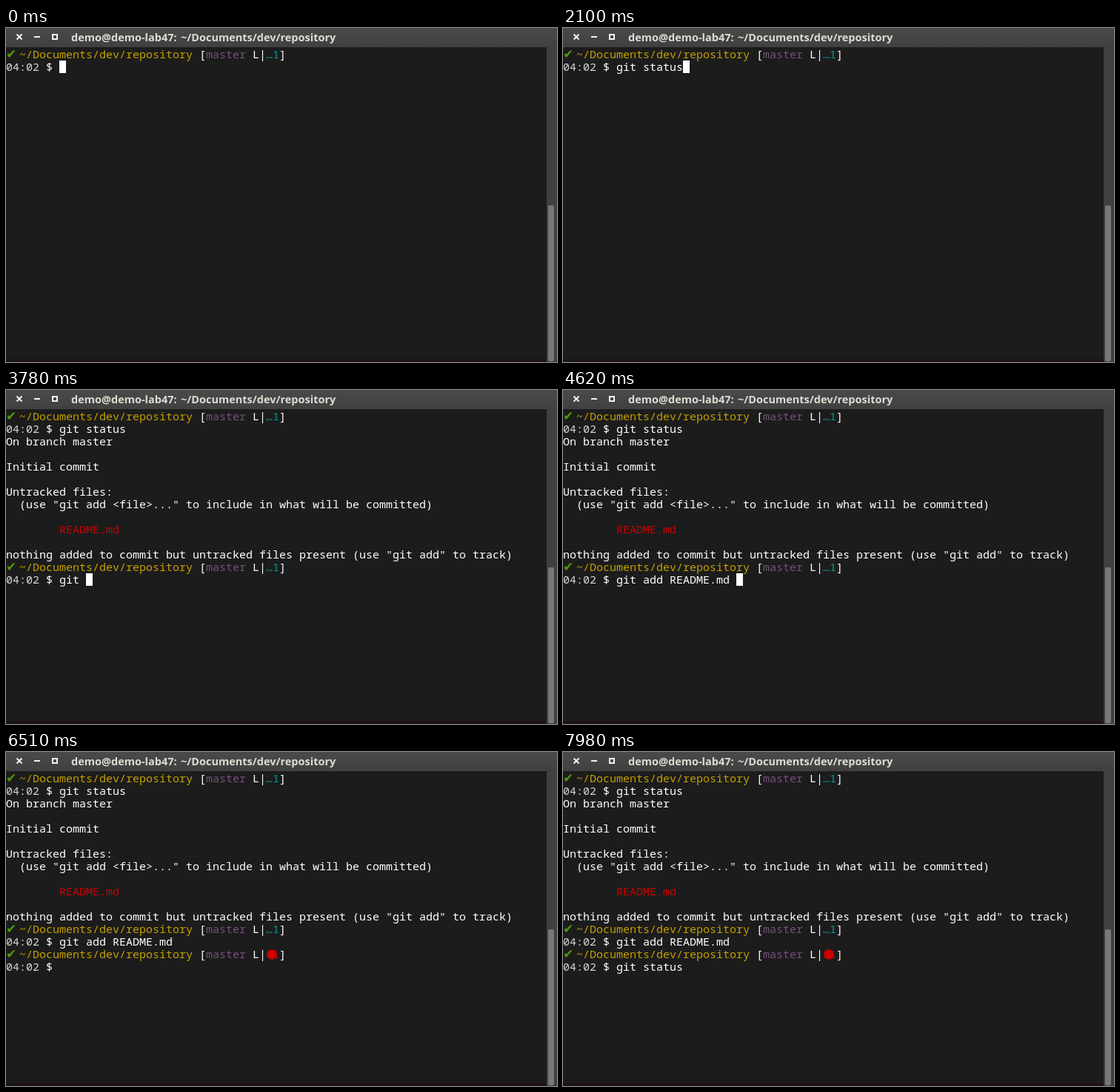
These frames come from a looping animation (744 by 452 pixels, 8 s). An HTML page:

```html
<!DOCTYPE html>
<html lang="en">
<head>
<meta charset="utf-8">
<title>Terminal</title>
<style>
  html, body { margin: 0; width: 100%; height: 100%; overflow: hidden; background: #1c1c1c; }
  svg { display: block; width: 744px; height: 452px; }
  text { white-space: pre; }
  #screen text { font: 15px "Noto Sans Mono", "Liberation Mono", monospace; }
  #screen .mark { font: 17px "DejaVu Sans", sans-serif; }
  .title { font: bold 14.5px "Open Sans", "Noto Sans", sans-serif; fill: #dfdbd2; }
</style>
</head>
<body>
<svg viewBox="0 0 744 452">
  <defs>
    <linearGradient id="bar" x2="0" y2="1">
      <stop offset="0" stop-color="#4a4a4a"/>
      <stop offset="1" stop-color="#404040"/>
    </linearGradient>
  </defs>
  <rect width="744" height="452" fill="#1c1c1c"/>
  <rect y="448" width="744" height="4" fill="#1d1217"/>
  <rect x="730" y="26" width="14" height="426" fill="#404040"/>
  <rect x="732" y="240" width="8" height="211" rx="2" fill="#787878"/>
  <rect width="744" height="26" fill="url(#bar)"/>
  <g fill="none" stroke="#f4f2ee" stroke-width="2">
    <path d="M14.5 8.5l7 7m0-7l-7 7M38 12h8"/>
    <rect x="63" y="9" width="6" height="6"/>
  </g>
  <text class="title" x="88" y="18">demo@demo-lab47:</text>
  <text class="title" x="236" y="18">~/Documents/dev/repository</text>
  <g id="screen"></g>
</svg>
<script>
const NS = 'http://www.w3.org/2000/svg';
const CELL = 9, LINE = 17, TOP = 27, LOOP = 8000;
const WHITE = '#ffffff', GREY = '#d3d7cf', YELLOW = '#c4a000', PURPLE = '#75507b',
      TEAL = '#06989a', GREEN = '#4e9a06', RED = '#cc0000';
const screen = document.getElementById('screen');

function add(parent, tag, attrs = {}) {
  const el = document.createElementNS(NS, tag);
  for (const k in attrs) el.setAttribute(k, attrs[k]);
  return parent.appendChild(el);
}

function put(parent, row, col, str, fill = WHITE) {
  const el = add(parent, 'text', { x: col * CELL, y: TOP + row * LINE + 14, fill });
  el.textContent = str;
  return el;
}

// Two-line prompt; returns the text element for the typed command.
function prompt(parent, row, staged) {
  put(parent, row, 0, '✔', GREEN).setAttribute('class', 'mark');
  put(parent, row, 2, '~/Documents/dev/repository', YELLOW);
  put(parent, row, 29, '[');
  put(parent, row, 30, 'master', PURPLE);
  put(parent, row, 37, 'L|');
  if (staged) {
    add(parent, 'circle', { cx: 359, cy: TOP + row * LINE + 9, r: 6.8, fill: RED });
  } else {
    put(parent, row, 39, '…', TEAL);
  }
  put(parent, row, 40, '1', staged ? RED : TEAL);
  put(parent, row, 41, ']');
  put(parent, row + 1, 0, '04:02', GREY);
  put(parent, row + 1, 6, '$');
  return put(parent, row + 1, 8, '');
}

const output = add(screen, 'g');
[
  [2, 0, 'On branch master'],
  [4, 0, 'Initial commit'],
  [6, 0, 'Untracked files:'],
  [7, 2, '(use "git add <file>..." to include in what will be committed)'],
  [9, 8, 'README.md', RED],
  [11, 0, 'nothing added to commit but untracked files present (use "git add" to track)']
].forEach(line => put(output, ...line));

// keys: [time, characters typed so far]; off: spans with the cursor hidden
const prompts = [
  { at: 0, end: 2520, row: 0, cmd: 'git status',
    keys: [[840, 1], [980, 2], [1120, 3], [1260, 4], [1610, 5], [1750, 6], [1820, 7], [1960, 9], [2100, 10]],
    off: [[70, 700]] },
  { at: 2590, end: 5950, row: 12, cmd: 'git add README.md ',
    keys: [[3360, 1], [3500, 2], [3640, 3], [3710, 4], [3850, 5], [3990, 6], [4130, 7], [4270, 8], [4480, 9], [4620, 18]],
    off: [[3150, 3360], [5250, 5880]] },
  { at: 5950, end: LOOP, row: 14, cmd: 'git status', staged: true,
    keys: [6650, 6790, 6860, 6930, 7000, 7140, 7210, 7280, 7350, 7420].map((t, i) => [t, i + 1]),
    off: [[6510, 6650], [7980, LOOP]] }
];
for (const p of prompts) {
  p.group = add(screen, 'g');
  p.text = prompt(p.group, p.row, p.staged);
}
const cursor = add(screen, 'rect', { width: CELL, height: LINE, fill: WHITE });

const show = (el, on) => el.setAttribute('visibility', on ? 'visible' : 'hidden');

function draw(t) {
  let row = 12, col = 0, lit = true;
  show(output, t >= 2520);
  for (const p of prompts) {
    const typed = p.keys.reduce((n, [at, count]) => t >= at ? count : n, 0);
    show(p.group, t >= p.at);
    p.text.textContent = p.cmd.slice(0, typed);
    if (t >= p.at && t < p.end) {
      row = p.row + 1;
      col = 8 + typed;
      lit = !p.off.some(([from, to]) => t >= from && t < to);
    }
  }
  cursor.setAttribute('x', col * CELL);
  cursor.setAttribute('y', TOP + row * LINE);
  show(cursor, lit);
}

const start = performance.now();
function tick() {
  draw((performance.now() - start) % LOOP);
  requestAnimationFrame(tick);
}
tick();
</script>
</body>
</html>
```
